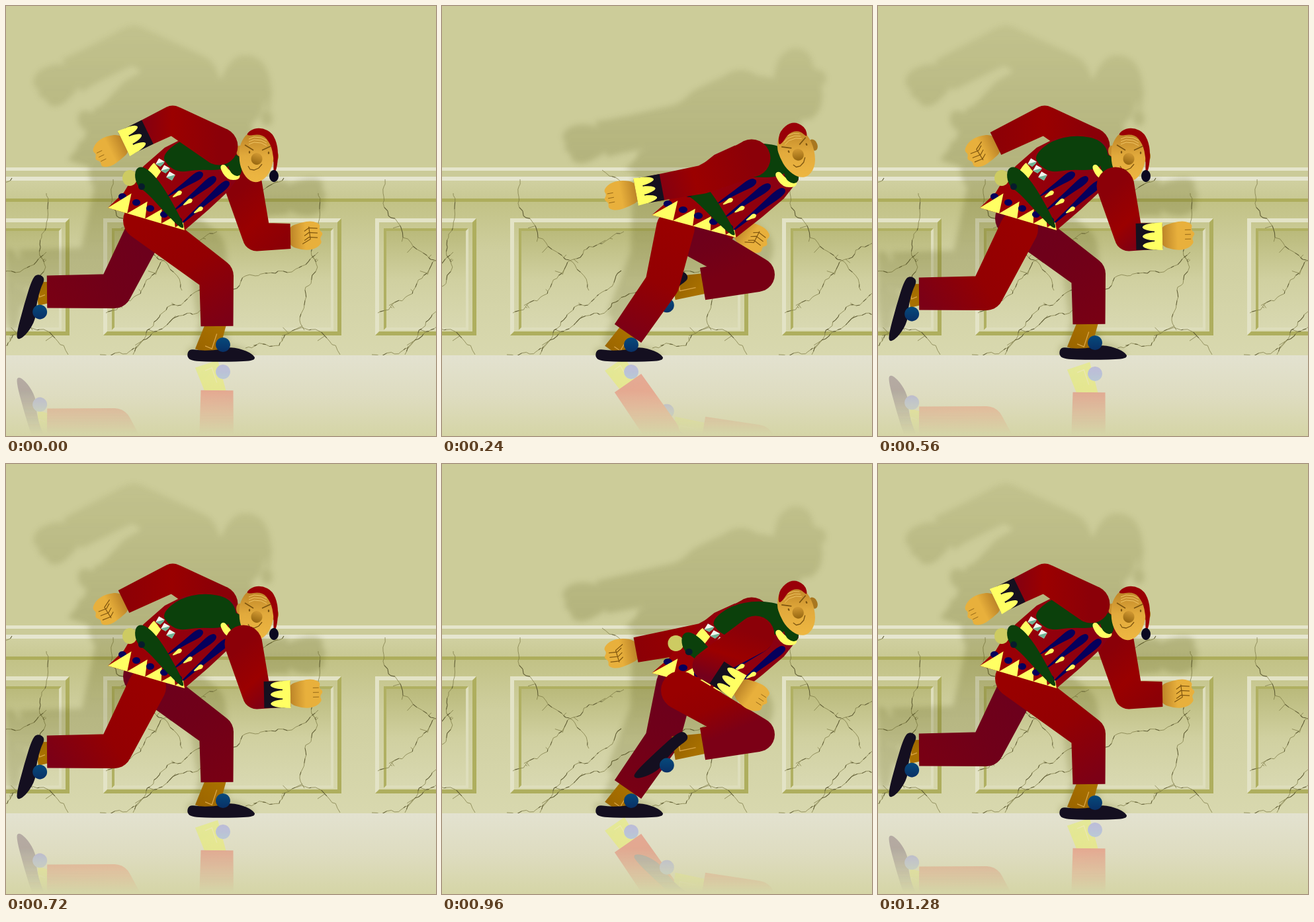
These frames come from a looping animation (650 by 650 pixels, 1440 ms). An HTML page with a canvas:

```html
<!DOCTYPE html>
<html lang="en">
<head>
<meta charset="utf-8">
<title>Running jester</title>
<style>
html, body { margin: 0; width: 100%; height: 100%; overflow: hidden; background: #cccc99; }
canvas { display: block; width: 650px; height: 650px; }
</style>
</head>
<body>
<canvas id="stage" width="650" height="650"></canvas>
<script>
const S = 650, FLOOR = 528, PERIOD = 411, STEP = 80;
const stage = document.getElementById('stage').getContext('2d');
const layerCanvas = document.createElement('canvas');
layerCanvas.width = layerCanvas.height = S;
const layer = layerCanvas.getContext('2d');

// Poses are relative to the runner's own position.
// Leg: hip, knee, ankle, heel, shoe angle
const plant = [206, 324, 318, 408, 319, 484, 274, 536, 0];
const stance = [188, 335, 168, 420, 116, 495, 67, 536, 0];
const trail = [213, 337, 164, 434, 62, 435, 43, 407, 106];
const lift = [195, 342, 312, 409, 229, 423, 198, 401, 137];
// Arm: shoulder, elbow, wrist
const back = [322, 212, 252, 172, 178, 208];
const straight = [303, 230, 230, 262, 128, 281];
const reach = [360, 275, 333, 348, 368, 397];
const ahead = [359, 272, 379, 349, 430, 348];
const across = [309, 258, 235, 305, 284, 337];

// Key times in steps: a stride has 8, a full cycle 16.
// The far limbs follow the near ones 8 steps apart.
const legKeys = { 0: plant, 3: stance, 5: trail, 8: trail, 11: lift, 13: plant };
const armKeys = { 0: back, 3: straight, 5: reach, 7: ahead, 8: ahead, 11: across, 13: back };
// wall shift, runner shift, lean
const strideKeys = { 0: [0, 0, 0], 3: [-44, 165, 1], 5: [-266, 142, 0], 7: [-PERIOD, 0, 0] };

function sample(keys, n, period) {
  n %= period;
  const at = Object.keys(keys).map(Number);
  const i = at.findLastIndex(k => k <= n);
  const next = at[i + 1] ?? period;
  const a = keys[at[i]], b = keys[next % period];
  return a.map((v, j) => v + (b[j] - v) * (n - at[i]) / (next - at[i]));
}

// Drawing state: context, point mapping, forced colour, reflection flag
let g = stage, warp = p => p, flat = null, mirrored = false;

const pairs = list => list.flatMap((v, i) => i % 2 ? [] : [[v, list[i + 1]]]);
const mix = (a, b, t) => [a[0] + (b[0] - a[0]) * t, a[1] + (b[1] - a[1]) * t];
const mid = (a, b) => mix(a, b, .5);
const dist = (a, b) => Math.hypot(b[0] - a[0], b[1] - a[1]);
const angle = (a, b) => Math.atan2(b[1] - a[1], b[0] - a[0]) * 180 / Math.PI;

function local([ox, oy], deg) {
  const c = Math.cos(deg * Math.PI / 180), s = Math.sin(deg * Math.PI / 180);
  return list => pairs(list).map(([x, y]) => [ox + x * c - y * s, oy + x * s + y * c]);
}

function trace(pts, smooth) {
  const q = pts.map(warp), n = q.length;
  g.moveTo(...(smooth ? mid(q[n - 1], q[0]) : q[0]));
  q.forEach((p, i) => smooth
    ? g.quadraticCurveTo(...p, ...mid(p, q[(i + 1) % n]))
    : g.lineTo(...p));
  g.closePath();
}

function paint(parts, color, smooth) {
  g.beginPath();
  parts.forEach(pts => trace(pts, smooth));
  g.fillStyle = flat || color;
  g.fill();
}
const shape = (pts, color) => paint([pts], color);
const blob = (pts, color) => paint([pts], color, true);

function line(pts, color, width = 1.2) {
  if (flat) return;
  g.beginPath();
  pts.map(warp).forEach((p, i) => i ? g.lineTo(...p) : g.moveTo(...p));
  g.strokeStyle = color;
  g.lineWidth = width;
  g.stroke();
}

const oval = ([x, y], rx, ry = rx) => Array.from({ length: 28 }, (_, i) => {
  const a = i * Math.PI / 14;
  return [x + rx * Math.cos(a), y - ry * Math.sin(a)];
});

function blend(a, b, ...colors) {
  const f = g.createLinearGradient(...warp(a), ...warp(b));
  colors.forEach((c, i) => f.addColorStop(i / (colors.length - 1), c));
  return f;
}

function segment(a, b, wa, wb) {
  const d = dist(a, b) || 1;
  const nx = (a[1] - b[1]) / d / 2, ny = (b[0] - a[0]) / d / 2;
  return [[a[0] + nx * wa, a[1] + ny * wa], [b[0] + nx * wb, b[1] + ny * wb],
          [b[0] - nx * wb, b[1] - ny * wb], [a[0] - nx * wa, a[1] - ny * wa]];
}

const limb = (a, b, c, wa, wb, wc, color) =>
  paint([oval(a, wa / 2), segment(a, b, wa, wb), oval(b, wb / 2), segment(b, c, wb, wc)], color);

function leg(pose, x, near) {
  const [hip, knee, ankle, heel] = pairs(pose.slice(0, 8)).map(p => [p[0] + x, p[1] - (near ? 0 : 3)]);
  const turn = pose[8], at = local(heel, turn);
  const [instep, pom] = at([29, -12, 54, -24]);
  shape(segment(mix(ankle, knee, .1), instep, 30, 36), blend(ankle, heel, '#a87000', '#946000'));
  line(segment(mix(ankle, instep, .25), mix(ankle, instep, .8), 8, 11).slice(1), '#d9a545', 1.3);
  if (!mirrored || Math.abs(turn) > 8)
    blob(at([-1, -7, 3, -18, 20, -15, 46, -16, 66, -21, 90, -15, 104, -5, 98, 1, 50, 2, 6, 1]), '#140f20');
  blob(oval(pom, 11), blend([pom[0], pom[1] - 11], [pom[0], pom[1] + 11], '#064a7c', '#093066'));
  limb(hip, knee, ankle, 58, 52, 49, near
    ? blend(hip, ankle, '#990000', '#930002', '#7c0016')
    : blend(hip, ankle, '#6c001d', '#700019', '#780014'));
}

function hand(wrist, dir, fist) {
  const [palm] = local(wrist, dir)([23, 0]);
  const at = local(palm, dir), ink = '#80560f';
  blob(at([-27, -14, -8, -20, 10, -23, 23, -17, 20, -9, 27, -3, 21, 4, 25, 11, 14, 20, -4, 22, -27, 14]),
    blend(wrist, palm, '#bd8528', '#e8b03c'));
  for (let y = -11; y < 10; y += 7)
    line(at(fist ? [18, y, 5, y - 1, -2, y + 4] : [20, y + 2, 11, y + 2]), ink, fist ? 1.2 : .8);
  if (fist) line(at([5, -14, 7, 5, -5, 12]), ink);
}

function arm(pose, x, near) {
  const [shoulder, elbow, wrist] = pairs(pose).map(p => [p[0] + x, p[1]]);
  const dir = angle(elbow, wrist);
  hand(wrist, dir, !near);
  limb(shoulder, elbow, wrist, 57, 43, 38, near
    ? blend(shoulder, wrist, '#8b0008', '#9b0000', '#74001c')
    : blend(shoulder, wrist, '#8a0008', '#990000', '#8c0006'));
  if (!near) return;
  const at = local(wrist, dir);
  shape(at([-40, -20, -8, -20, -8, 20, -40, 20]), '#15101f');
  shape(at([-12, -20, 0, -21, 0, 21, -12, 20]), '#ffff63');
  for (let y = -14; y < 15; y += 14)
    blob(at([-6, y - 7, -24, y - 5, -32, y, -24, y + 5, -6, y + 7]), '#ffff63');
}

function tear(tip, bulb, w) {
  const len = dist(tip, bulb);
  return local(tip, angle(tip, bulb))([0, -1, len * .6, -w * .6, len, -w, len + w, 0, len, w, len * .6, w * .5, 0, 1]);
}

function torso(shift, lean) {
  const at = pts => pts.map(([x, y]) => [x + shift + lean * (x - 172) * .097, y + lean * 11]);
  const area = (list, color) => blob(at(pairs(list)), color);
  const navy = '#05005c', green = '#0b400b', yellow = '#ffff63';
  const hem = [154, 305], tip = [270, 339];
  shape(at(pairs([...hem, 178, 282, 190, 262, 208, 242, 240, 214, 268, 200, 300, 196, 340, 204, 357, 225,
    356, 252, 336, 280, 306, 308, ...tip])), blend(...at([hem, [350, 245]]), '#a00000', '#870015'));
  area([236, 226, 262, 203, 300, 195, 338, 202, 352, 230, 328, 249, 290, 247, 262, 252, 244, 241], green);
  area([206, 262, 222, 236, 236, 232, 240, 242, 226, 262, 216, 276], yellow);
  for (let i = 0; i < 3; i++) {
    const x = 233 + 8 * i, y = 237 + 10 * i;
    shape(at(local([x, y], 50)([-8, -7, 8, -7, 8, 7, -8, 7])), '#93000c');
    shape(at(local([x, y], 30)([-5, -5, 5, -5, 5, 5, -5, 5])), '#f1f7ee');
    shape(at(local([x, y], 30)([5, -5, 5, 5, -5, 5])), '#6fb394');
    blob(at(tear([244 + 9 * i, 288 + 22 * i], [293 + 20 * i, 255 + 7 * i], 7)), navy);
  }
  for (let i = 0; i < 3; i++)
    blob(at(tear([252 + 16 * i, 289 + 12 * i], [263 + 16 * i, 282 + 12 * i], 4)), yellow);
  // zigzag hem
  const base = i => mix(hem, tip, 1 - (1 - i / 5) ** 1.3);
  for (let i = 0; i < 5; i++) {
    const [x, y] = mid(base(i), base(i + 1));
    shape(at(oval([176 + 21 * i, 288 + 9 * i], 6, 5)), navy);
    shape(at([base(i), [x + 21 - 4 * i, y - 26 + 4 * i], base(i + 1)]), yellow);
  }
  // club
  shape(at(oval([187, 260], 11, 12)), '#cdcb62');
  area([194, 254, 199, 243, 211, 244, 228, 260, 246, 287, 270, 332, 266, 338, 240, 312, 214, 283, 198, 272], green);
  shape(at(oval([205, 273], 5)), '#071c2c');
  // collar
  area([322, 243, 330, 238, 338, 250, 354, 252, 353, 263, 334, 263], yellow);
  area([334, 240, 346, 222, 357, 232, 356, 258, 342, 256], green);
}

function head(x, y, deg, tail) {
  const at = local([x, y], deg), plain = local([x, y], 0), ink = '#7d5510';
  const spot = (cx, cy, rx, ry, color) => shape(at(oval([cx, cy], rx, ry).flat()), color);
  spot(27, -1, 6, 9, '#a87720');
  if (tail) spot(-26, -9, 5, 8, '#c88e2b');
  blob(at([-25, -20, -14, -37, 8, -40, 24, -25, 27, 0, 19, 27, 2, 40, -14, 35, -25, 16, -27, -4]),
    blend([x, y - 36], [x, y + 34], '#bd8426', '#e2aa3c', '#edb641'));
  for (let h = -30; h < -20; h += 4) line(at([-12, h + 3, -4, h, 7, h + 1, 15, h + 5]), '#f0c564', 1);
  line(at([-18, -18, -5, -10]), ink, 1.6);
  line(at([8, -10, 21, -16]), ink, 1.6);
  spot(-11, -7, 1.2, 2, ink);
  spot(18, -6, 1.2, 2, ink);
  spot(0, 3, 8.5, 9, blend(...at([3, -6, -3, 12]), '#d49b34', '#94650f'));
  line(at([-13, 14, -10, 19, -4, 20, 3, 17, 8, 11]), ink, 1.3);
  if (tail) {
    blob(plain([-18, -31, -8, -42, 8, -44, 24, -36, 32, -16, 32, 8, 28, 25, 25, 22, 26, 2, 21, -20, 8, -35]), '#990005');
    blob(oval([x + 26, y + 29], 7, 9), '#0b0920');
  } else {
    blob(plain([-29, -12, -27, -33, -8, -48, 12, -40, 16, -22, 4, -34, -12, -31, -23, -14]), '#990008');
  }
}

function runner(n) {
  const [, x, lean] = sample(strideKeys, n, 8);
  const raised = n > 8 && n < 13;
  const nearLeg = () => leg(sample(legKeys, n, 16), x, true);
  arm(sample(armKeys, n + 8, 16), x, false);
  leg(sample(legKeys, n + 8, 16), x, false);
  if (!raised) nearLeg();
  torso(x, lean);
  if (raised) nearLeg();
  head(379 + x - 7 * lean, 228 - 6 * lean, -24 * lean, x < 80 && lean < .3);
  arm(sample(armKeys, n, 16), x, true);
}

// Wall cracks: a few key points joined by random midpoint displacement
const cracks = (() => {
  let seed = 11;
  const rnd = () => (seed = seed * 16807 % 2147483647) / 2147483647 - .5;
  const fine = new Path2D(), bold = new Path2D();
  function split(a, b) {
    const d = dist(a, b);
    if (d < 8) {
      const path = rnd() > .1 ? bold : fine;
      path.moveTo(...a);
      path.lineTo(...b);
      if (rnd() > .36) {
        fine.moveTo(...b);
        fine.lineTo(b[0] + rnd() * 22, b[1] + rnd() * 20);
      }
      return;
    }
    const m = mid(a, b).map(v => v + rnd() * d * .32);
    split(a, m);
    split(m, b);
  }
  [
    [15, 262, 42, 350, 119, 430], [172, 341, 90, 385, 4, 464], [45, 527, 97, 455, 168, 400],
    [-5, 527, 100, 478, 215, 408], [215, 408, 285, 402, 325, 372], [325, 283, 318, 345, 304, 490],
    [215, 517, 300, 486, 358, 527], [139, 248, 205, 292, 273, 260]
  ].forEach(list => {
    const [a, b, c] = pairs(list);
    split(a, b);
    split(b, c);
  });
  return { fine, bold };
})();

function rect(x, y, w, h, color) {
  stage.fillStyle = color;
  stage.fillRect(x, y, w, h);
}
const fade = (y0, y1, ...colors) => blend([0, y0], [0, y1], ...colors);

function bevel(l, t, r, b, w, light, dark) {
  shape(pairs([l, b, l, t, r, t, r - w, t + w, l + w, t + w, l + w, b - w]), light);
  shape(pairs([r, t, r, b, l, b, l + w, b - w, r - w, b - w, r - w, t + w]), dark);
}

function wall(shift) {
  rect(0, 0, S, 244, '#cccc99');
  rect(0, 244, S, 5, '#e5e5cc');
  rect(0, 249, S, 9, '#cbcb99');
  rect(0, 258, S, 6, '#e6e6d0');
  rect(0, 264, S, 27, fade(264, 291, '#d0d0a0', '#c9c994'));
  rect(0, 291, S, 5, '#adad5c');
  rect(0, 296, S, FLOOR - 296, fade(296, FLOOR, '#c2c286', '#cfcf9f', '#d4d4a8', '#d8d8ae'));
  for (let x = 147 + shift - PERIOD; x < S; x += PERIOD) {
    stage.save();
    stage.translate(x, 0);
    bevel(0, 321, 360, 498, 6, '#e3e3c6', '#aeae5e');
    rect(14, 337, 333, 152, fade(337, 489, '#b9b97a', '#d0d0a0', '#d9d9b2'));
    bevel(13, 336, 348, 490, 4, '#b0b062', '#dedebc');
    stage.strokeStyle = '#77743f';
    stage.lineWidth = .7;
    stage.stroke(cracks.fine);
    stage.strokeStyle = '#5f5c34';
    stage.lineWidth = 1.1;
    stage.stroke(cracks.bold);
    stage.restore();
  }
}

// Paints the runner on the layer, then limits it by a vertical mask.
function onLayer(n, map, mask, setup) {
  g = layer;
  warp = map;
  layer.clearRect(0, 0, S, S);
  setup();
  runner(n);
  warp = p => p;
  layer.globalCompositeOperation = flat ? 'source-in' : 'destination-in';
  layer.fillStyle = mask();
  layer.fillRect(0, 0, S, S);
  layer.globalCompositeOperation = 'source-over';
  g = stage;
  flat = null;
  mirrored = false;
}

function stamp(y, h, filter, alpha) {
  stage.save();
  stage.beginPath();
  stage.rect(0, y, S, h);
  stage.clip();
  stage.filter = filter;
  stage.globalAlpha = alpha;
  stage.drawImage(layerCanvas, 0, 0);
  stage.restore();
}

function draw(n) {
  const [shift, x, lean] = sample(strideKeys, n, 8);
  wall(shift);

  // The shadow grows with height, away from a light near the floor.
  const centre = 449 + (x - 7 * lean) * .47;
  const cast = ([px, py]) => {
    const h = Math.min(1, (530 - py) / 330);
    return [centre + (px - centre) * (1 + .3 * h), 530 - (530 - py) * 1.32];
  };
  onLayer(n, cast, () => fade(0, FLOOR, 'rgba(96,96,28,.07)', 'rgba(96,96,28,.24)', 'rgba(96,96,28,.2)'),
    () => { flat = '#000'; });
  stamp(0, FLOOR, 'blur(4px)', 1);

  rect(0, FLOOR, S, S - FLOOR, fade(FLOOR, S, '#e3e2d0', '#dedcc0', '#d5d5a6'));
  onLayer(n, ([px, py]) => [px, 1065 - py], () => fade(580, 648, '#000', 'rgba(0,0,0,0)'),
    () => { mirrored = true; });
  stamp(FLOOR, S - FLOOR, 'hue-rotate(25deg) brightness(2.2)', .26);

  runner(n);
}

const start = performance.now();
let shown = -1;
(function loop() {
  // Each stride rests on its eighth step before the next one begins.
  const t = (performance.now() - start) % 1440, half = Math.floor(t / 720);
  const n = half * 8 + Math.min(7, Math.floor((t - half * 720) / STEP));
  if (n !== shown) draw(shown = n);
  requestAnimationFrame(loop);
})();
</script>
</body>
</html>
```
